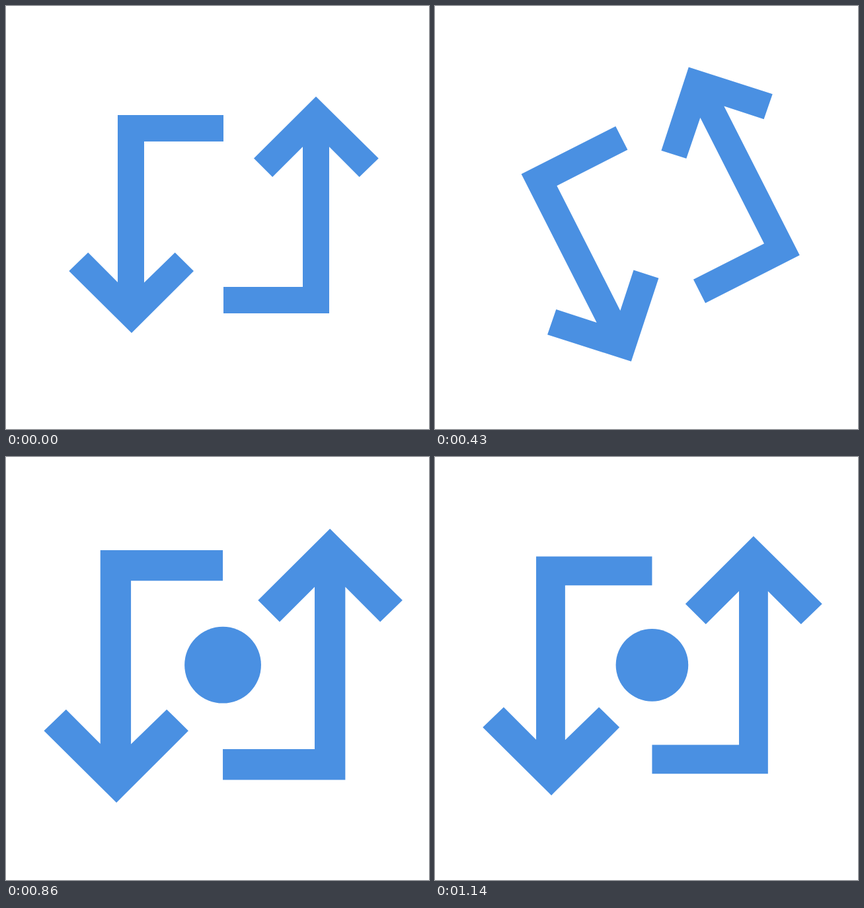
An HTML page that plays this animation: 640 by 640 pixels, repeating every 1.21 s.

```html
<!DOCTYPE html>
<html lang="en">
<head>
<meta charset="utf-8">
<title>Repeat</title>
<style>
  html, body { margin: 0; width: 100%; height: 100%; overflow: hidden; background: #fff; }
  svg { display: block; width: 100%; height: 100%; }
</style>
</head>
<body>
<svg viewBox="0 0 640 640">
  <g id="icon" fill="#4a90e2">
    <path d="M329 165V205H209V418.5L255.7 373L284 401L190 494.8L95.3 401L124.2 373L169 418V165Z"/>
    <path d="M329 465V425H449V213L403.2 258.7L375 230.5L469 137L563.7 230.5L534.6 258.7L489 213V465Z"/>
    <circle id="dot" cx="329" cy="315" r="50"/>
  </g>
</svg>
<script>
  const LOOP = 1210, FPS = 14;
  const PIVOT = { x: 335, y: 316.8 };
  const PULSE = { peak: 13.79, half: 3.45, size: 0.336 };
  // Counterclockwise degrees per step; the spin speeds up, then settles.
  const SPIN = [0, 12, 38, 78, 126.8, 166.5, 206.9, 257, 303.5, 333, 350, 360];

  const icon = document.getElementById('icon');
  const dot = document.getElementById('dot');

  function pulseScale(step) {
    const x = (step - PULSE.peak) / PULSE.half;
    return Math.abs(x) < 1 ? 1 + PULSE.size * (1 + Math.cos(Math.PI * x)) / 2 : 1;
  }

  function draw(ms) {
    const step = Math.floor((ms % LOOP + 5) * FPS / 1000);
    const angle = SPIN[Math.min(step, SPIN.length - 1)];
    const { x, y } = PIVOT;
    icon.setAttribute('transform',
      `translate(${x} ${y}) rotate(${-angle}) scale(${pulseScale(step)}) translate(${-x} ${-y})`);
    dot.setAttribute('visibility', step >= SPIN.length - 1 ? 'visible' : 'hidden');
  }

  const start = performance.now();
  function tick() {
    draw(performance.now() - start);
    requestAnimationFrame(tick);
  }
  tick();
</script>
</body>
</html>
```
